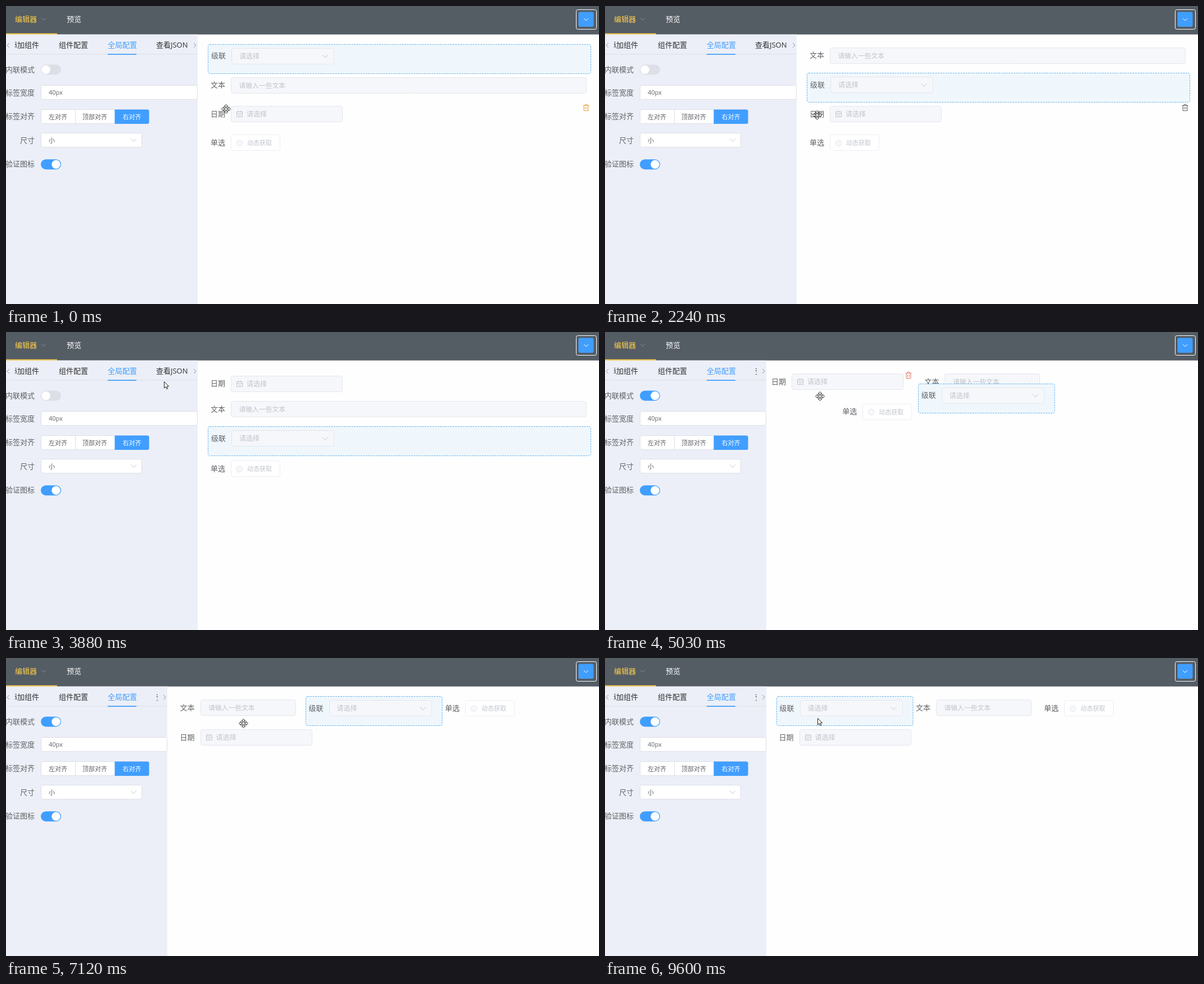
An HTML page with a canvas for the animation above (9.83 s loop, 1055 by 531 pixels).

```html
<!DOCTYPE html>
<html lang="zh">
<head>
<meta charset="utf-8">
<style>
  html, body { margin: 0; overflow: hidden; background: #fff; }
  canvas { display: block; }
</style>
</head>
<body>
<canvas id="stage" width="1055" height="531"></canvas>
<script>
const ctx = document.getElementById('stage').getContext('2d');
const LOOP = 9830, BLUE = '#409eff', GREY = '#606266', PALE = '#c0c4cc', LINE = '#dcdfe6';
const TOGGLE = 4600; // inline mode is switched on

// ---------- drawing helpers ----------
function text(str, x, y, size, color, align = 'left') {
  ctx.font = `${size}px "Open Sans", "Noto Sans CJK SC", "Noto Sans CJK", sans-serif`;
  ctx.textAlign = align;
  ctx.fillStyle = color;
  ctx.fillText(str, x, y + size * 0.37);
}

function box(x, y, w, h, radius, fill, stroke) {
  ctx.beginPath();
  ctx.roundRect(Math.round(x) + 0.5, Math.round(y) + 0.5, w - 1, h - 1, radius);
  if (fill) { ctx.fillStyle = fill; ctx.fill(); }
  if (stroke) { ctx.strokeStyle = stroke; ctx.lineWidth = 1; ctx.stroke(); }
}

function solid(x, y, w, h, radius, color) {
  ctx.beginPath();
  ctx.roundRect(x, y, w, h, radius);
  ctx.fillStyle = color;
  ctx.fill();
}

function line(color, ...points) {
  ctx.beginPath();
  points.forEach(([x, y]) => ctx.lineTo(x, y));
  ctx.strokeStyle = color;
  ctx.lineWidth = 1;
  ctx.stroke();
}

const chevron = (x, y, color, r = 5) =>
  line(color, [x - r, y - r / 2], [x, y + r / 2], [x + r, y - r / 2]);

const sideArrow = (x, y, dir) =>
  line('#909399', [x - 2 * dir, y - 4], [x + 2 * dir, y], [x - 2 * dir, y + 4]);

function rect(x, y, w, h, color) {
  ctx.fillStyle = color;
  ctx.fillRect(x, y, w, h);
}

function disc(x, y, r, fill, stroke) {
  ctx.beginPath();
  ctx.arc(x, y, r, 0, 7);
  ctx.fillStyle = fill;
  ctx.fill();
  if (stroke) { ctx.strokeStyle = stroke; ctx.lineWidth = 1; ctx.stroke(); }
}

function toggle(y, on) {
  solid(62, y - 9, 36, 18, 9, on ? BLUE : LINE);
  disc(on ? 89 : 71, y, 7.8, '#fff');
}

function clipped(x, y, w, h, draw) {
  ctx.save();
  ctx.beginPath();
  ctx.rect(x, y, w, h);
  ctx.clip();
  draw();
  ctx.restore();
}

// ---------- fixed parts ----------
function header() {
  rect(0, 0, 1055, 50.7, '#545c64');
  rect(0, 48.7, 91, 2, '#ffd04b');
  text('编辑器', 16, 23.5, 13, '#ffd04b');
  chevron(67, 23.5, '#909399', 4);
  text('预览', 108, 23.5, 13, '#fff');
  box(1014, 6, 37, 36, 3, null, '#fff');
  solid(1018.5, 10.5, 27, 26.5, 3, BLUE);
  chevron(1032, 24, '#fff', 4);
}

function panel(inline) {
  const right = inline ? 287 : 341;
  rect(0, 50.7, right, 481, '#eceff7');
  rect(0, 85.3, right, 1, LINE);
  rect(181, 85.2, 51, 1.7, BLUE);
  sideArrow(4, 70, -1);
  sideArrow(right - 5, 70, 1);
  clipped(16, 51, right - 33, 34, () => {
    text('添加组件', 7, 69, 13, '#303133');
    text('组件配置', 94, 69, 13, '#303133');
    text('全局配置', 181, 69, 13, BLUE);
    text('查看JSON', 267, 69, 13, '#303133');
  });
  [['内联模式', 113], ['标签宽度', 154], ['标签对齐', 196], ['尺寸', 239], ['验证图标', 281.5]]
    .forEach(([label, y]) => text(label, 51, y, 13, GREY, 'right'));
  toggle(113.5, inline);
  toggle(282.2, true);
  box(62, 141, right - 62, 26, 3, '#fff', LINE);
  text('40px', 76, 154, 11, GREY);
  box(62, 184, 192, 26, 3, '#fff', LINE);
  rect(123, 185, 1, 24, LINE);
  solid(193.4, 184.5, 61.2, 25.5, [0, 3, 3, 0], BLUE);
  text('左对齐', 76, 197.5, 11, GREY);
  text('顶部对齐', 136, 197.5, 11, GREY);
  text('右对齐', 207.5, 197.5, 11, '#fff');
  box(62, 226, 180, 26, 3, '#fff', LINE);
  text('小', 76, 239.5, 11, GREY);
  chevron(227, 239, PALE);
}

// ---------- form items: c cascader, t text, d date, r radio ----------
const LABEL = { c: '级联', t: '文本', d: '日期', r: '单选' };
const WIDTH = { c: 243.5, t: 228, d: 257.5, r: 146 };
const itemWidth = (k, inline) => inline ? WIDTH[k] : 682;

function item(k, x, y, inline) {
  if (k === 'c') {
    ctx.setLineDash([3, 1.5]);
    box(x, y, itemWidth(k, inline), 53, 3, '#f0f7fc', '#66b4ee');
    ctx.setLineDash([]);
    x++; y++;
  }
  const fx = x + 41, fy = y + 6, mid = fy + 14.5;
  text(LABEL[k], x + 5, y + 19.5, 13, GREY);
  const fieldWidth = { c: 183, t: inline ? 170 : 633, d: 199, r: 88 }[k];
  box(fx, fy, fieldWidth, 29, 3, k === 'r' ? '#fff' : '#f5f7fa', k === 'r' ? '#ebeef5' : '#e4e7ed');
  if (k === 'c') {
    text('请选择', fx + 14, mid, 12, PALE);
    chevron(fx + 167, mid, PALE);
  } else if (k === 't') {
    text('请输入一些文本', fx + 14.5, mid, 11.8, PALE);
  } else if (k === 'd') {
    box(fx + 10, fy + 10, 11, 10, 0, null, PALE);
    rect(fx + 11, fy + 13, 9, 1, PALE);
    rect(fx + 13, fy + 8, 1, 3, PALE);
    rect(fx + 17, fy + 8, 1, 3, PALE);
    rect(fx + 13, fy + 16, 5, 1, PALE);
    text('请选择', fx + 28, mid, 12, PALE);
  } else {
    disc(fx + 15.5, mid + 0.5, 5.5, '#f5f7fa', '#e4e7ed');
    text('动态获取', fx + 29, mid + 0.5, 11, PALE);
  }
}

function trash(x, y, color) {
  line(color, [x - 5.5, y - 3.5], [x + 5.5, y - 3.5]);
  line(color, [x - 2, y - 3.5], [x - 2, y - 5.5], [x + 2, y - 5.5], [x + 2, y - 3.5]);
  line(color, [x - 4, y - 3.5], [x - 4, y + 5.5], [x + 4, y + 5.5], [x + 4, y - 3.5]);
  line(color, [x - 1.5, y - 1], [x - 1.5, y + 3]);
  line(color, [x + 1.5, y - 1], [x + 1.5, y + 3]);
}

// ---------- layouts ----------
function stack(order) {
  const at = {};
  let y = 68;
  for (const k of order) { at[k] = [359, y]; y += k === 'c' ? 53 : 51.2; }
  return at;
}

function flow(order) {
  const at = {};
  let x = 304.5, y = 68.4;
  for (const k of order) {
    if (x + WIDTH[k] > 1038) { x = 304.5; y += 53; }
    at[k] = [x, y + (k === 'r' ? 0.8 : 0)];
    x += WIDTH[k];
  }
  return at;
}

const midway = { c: [555, 92], t: [563.5, 68.5], d: [291, 68.5], r: [418, 121.6] };

// start, layout, layout to glide from, duration, ease-out power
const moves = [
  [0, stack('ctdr')],
  [700, stack('tcdr')],
  [1230, stack('tcdr'), stack('ctdr')],
  [2750, stack('dtcr')],
  [3550, stack('dtcr'), stack('tcdr')],
  [TOGGLE, midway, stack('dtcr'), 430, 1],
  [5030, flow('dtcr'), midway, 400],
  [6190, flow('tcrd')],
  [6540, flow('tcrd'), flow('dtcr')],
  [8000, flow('ctrd')],
  [8560, flow('ctrd'), flow('tcrd')],
];

function layoutAt(t) {
  const [start, to, from = to, length = 500, power = 3] = moves.findLast(m => m[0] <= t);
  const e = 1 - (1 - Math.min(1, (t - start) / length)) ** power;
  const at = {};
  for (const k in to) at[k] = to[k].map((v, i) => from[k][i] + (v - from[k][i]) * e);
  return at;
}

// ---------- pointer ----------
// time, x, y, shape from this time on
const path = [
  [0, 391, 183, 'move'], [450, 382, 92, 'move'], [540, 382, 92, 'drag'],
  [990, 383, 141, 'drag'], [1150, 383, 144, 'drag'], [1230, 383, 144, 'arrow'],
  [1400, 384, 148, 'move'], [2240, 377, 194, 'move'], [2310, 377, 194, 'drag'],
  [2940, 373, 96, 'drag'], [3090, 373, 96, 'drag'], [3550, 366, 94, 'arrow'],
  [3880, 281, 88, 'arrow'], [4030, 263, 92, 'arrow'], [4450, 80, 112, 'arrow'],
  [4650, 80, 112, 'arrow'], [4960, 350, 114, 'move'], [5030, 382, 114, 'move'],
  [5790, 322, 90, 'move'], [5960, 321, 90, 'move'], [6100, 318, 86, 'drag'],
  [6420, 305, 149, 'drag'], [6540, 305, 149, 'arrow'], [6800, 315, 140, 'move'],
  [7500, 548, 88, 'move'], [7580, 548, 88, 'drag'], [8130, 384, 96, 'drag'],
  [8440, 382, 98, 'drag'], [8560, 382, 98, 'arrow'], [9520, 378, 107, 'arrow'],
  [LOOP, 378, 107, 'arrow'],
];

function pointerAt(t) {
  const i = path.findLastIndex(p => p[0] <= t);
  const a = path[i], b = path[i + 1];
  const p = (t - a[0]) / (b[0] - a[0]);
  return { x: a[1] + (b[1] - a[1]) * p, y: a[2] + (b[2] - a[2]) * p, shape: a[3] };
}

function polygon(points) {
  ctx.beginPath();
  points.forEach(([x, y]) => ctx.lineTo(x, y));
  ctx.closePath();
  ctx.fillStyle = '#fff';
  ctx.strokeStyle = '#222';
  ctx.lineWidth = 1;
  ctx.fill();
  ctx.stroke();
}

const arm = [[-1.2, -1.2], [-1.2, -4.5], [-3.5, -4.5], [0, -8], [3.5, -4.5], [1.2, -4.5]];
const cross = [0, 1, 2, 3].flatMap(turn => arm.map(([x, y]) =>
  [[x, y], [-y, x], [-x, -y], [y, -x]][turn]));
const arrow = [[0, 0], [0, 11.5], [2.7, 9], [4.5, 13], [6.3, 12.2], [4.6, 8.4], [8, 8.2]];

function pointer({ x, y, shape }) {
  ctx.save();
  ctx.translate(Math.round(x) + 0.5, Math.round(y) + 0.5);
  polygon(shape === 'move' ? cross : arrow);
  if (shape === 'drag') box(1, 11, 10, 6, 0, '#fff', '#222');
  ctx.restore();
}

// ---------- dragging and hovering ----------
// from, to, item, start layout, grab point
const drags = [
  [540, 1230, 'c', stack('ctdr'), 382, 92],
  [2310, 3550, 'd', stack('tcdr'), 377, 194],
  [6100, 6540, 'd', flow('dtcr'), 318, 86],
  [7580, 8560, 'c', flow('tcrd'), 548, 88],
];

// from, to, item, icon colour
const hovers = [
  [0, 280, 'd', '#e6a23c'], [280, 1230, 'c', '#e6a23c'], [1400, 1750, 'c', GREY],
  [1750, 3550, 'd', GREY], [4960, 6190, 'd', '#df7f66'], [6190, 6570, 't', GREY],
  [7300, 8500, 'c', '#d9705a'],
];

const active = (list, t) => list.find(([from, to]) => t >= from && t < to);

function render(t) {
  const inline = t >= TOGGLE;
  const at = layoutAt(t), mouse = pointerAt(t);
  rect(0, 0, 1055, 531, '#fefefe');
  header();
  panel(inline);
  for (const k of 'dtcr') item(k, ...at[k], inline);

  const hover = active(hovers, t);
  if (hover) {
    const [x, y] = at[hover[2]];
    trash(Math.round(x + itemWidth(hover[2], inline)) - 9, Math.round(y) + 9, hover[3]);
  }

  const drag = active(drags, t);
  if (drag) {
    const [, , k, start, grabX, grabY] = drag;
    const x = start[k][0] + mouse.x - grabX, y = start[k][1] + mouse.y - grabY;
    ctx.globalAlpha = 0.45;
    clipped(x, y, k === 'c' && inline ? 110 : 267, 54, () => item(k, x, y, inline));
    ctx.globalAlpha = 1;
  }
  pointer(mouse);
}

function tick() {
  render(performance.now() % LOOP);
  requestAnimationFrame(tick);
}
tick();
</script>
</body>
</html>
```
